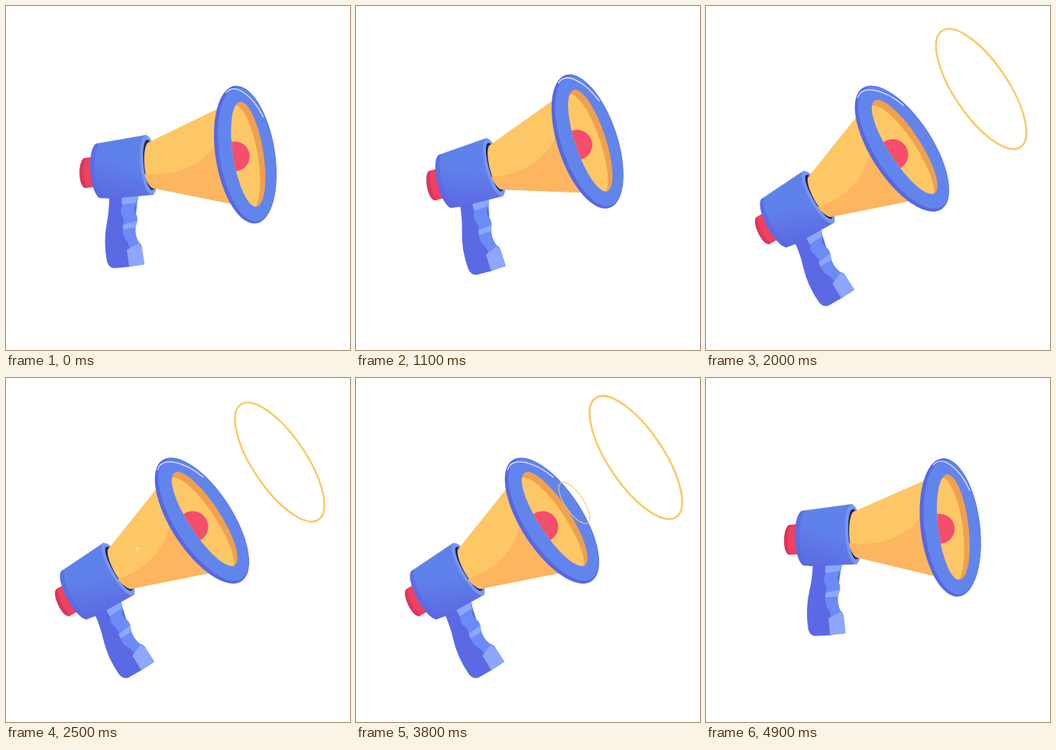
An HTML page for the animation above (5000 ms loop, 450 by 450 pixels).

```html
<!DOCTYPE html>
<html>
<head>
<meta charset="utf-8">
<style>
html, body { margin: 0; width: 100%; height: 100%; overflow: hidden; background: #fff; }
svg { display: block; width: 100vw; height: 100vh; }
</style>
</head>
<body>
<svg viewBox="0 0 450 450">
  <defs>
    <linearGradient id="body" x1=".55" y1="0" x2=".3" y2="1">
      <stop offset=".4" stop-color="#5f82ea"/><stop offset="1" stop-color="#5c69e3"/>
    </linearGradient>
    <clipPath id="mouth"><ellipse cx="4" rx="20" ry="69.500"/></clipPath>
  </defs>
  <g id="horn">
    <path fill="#f2405f" d="M103 199L116 197V237L104 238C94 237 94 200 103 199Z"/>
    <path fill="#dd3560" d="M103 199C94 200 94 237 104 238L107 237.500C100 232 99 204 106 198.500Z"/>
    <path fill="#5b6ae4" d="M134 246L173 243L163 341L141 343Q134 342 132 334Q127 308 132 283Q135 268 135 250Z"/>
    <path fill="#6c8bf6" d="M151 250L173 246Q174 254 168 263Q167 268 171 274Q173 279 170 287Q168 298 173 308Q178 312 178 318L181 338L161 341L162 320Q161 313 159 309Q152 302 153 290Q156 280 151 272Q149 267 152 261Z"/>
    <path fill="#8ca7fd" d="M151 249H173L170 257L152 260ZM153 286L172 281L169 290L153 292ZM158 319L174 310L178 318L181 338L161 341Z"/>
    <path fill="url(#body)" d="M118 180L184 168.500L193 247L137 252L122 251C108 240 106 187 118 180Z"/>
    <path fill="#5b69e2" d="M118 180C106 187 108 240 122 251L127 251.500C114 236 113 194 122 179.500Z" opacity=".7"/>
    <g transform="translate(187 208) rotate(-6)">
      <ellipse rx="11" ry="39" fill="#7896f6"/>
      <ellipse cx="1" rx="8" ry="33" fill="#23264f"/>
    </g>
    <path id="cone" fill="#fdc766"/>
    <path id="shade" fill="#fdb55f"/>
    <path id="star" fill="#fffbe8"/>
    <g id="rim">
      <ellipse rx="38.900" ry="91" fill="#5868e2"/>
      <ellipse cx="2.200" rx="36" ry="88.500" fill="#6285ed"/>
      <path d="M-12 -84C2 -96 22 -74 31 -45" fill="none" stroke="#fff" stroke-width="1.300" stroke-linecap="round" opacity=".8"/>
      <g clip-path="url(#mouth)">
        <ellipse cx="4" rx="20" ry="69.500" fill="#f0a04e"/>
        <ellipse cx="-4" cy="4" rx="20" ry="70" fill="#fdc766"/>
        <circle cx="-14" r="19.500" fill="#f34e6b"/>
      </g>
    </g>
  </g>
  <g id="waves" fill="none" stroke="#f9ca66"></g>
</svg>
<script>
const LOOP = 5000, FIRST = 1550, PERIOD = 550, COUNT = 5, LIFE = 720;
const $ = id => document.getElementById(id);

// poses: button x, button y, angle
const READY = [116, 206, 3.5], START = [104, 218, 0], LIFT = [104, 230, -7.5],
  HOLD = [99, 236, -10], WIND = [73, 305, -28.2], SHOUT = [75, 293, -24];
const TIMELINE = [
  [-200, READY], [0, START], [600, LIFT], [1200, HOLD], [1500, WIND],
  [1650, SHOUT], [4300, SHOUT], [4450, WIND], [4800, READY]
];

// speed through a key: zero at turning points, so nothing overshoots
function speed(n, axis) {
  const slope = i => (TIMELINE[i + 1][1][axis] - TIMELINE[i][1][axis]) / (TIMELINE[i + 1][0] - TIMELINE[i][0]);
  if (n === 0 || n === TIMELINE.length - 1) return 0;
  const a = slope(n - 1), b = slope(n);
  return a * b > 0 ? 2 * a * b / (a + b) : 0;
}

function poseAt(t) {
  if (t >= 4800) t -= LOOP;
  const i = TIMELINE.findLastIndex(key => key[0] <= t);
  const [t0, from] = TIMELINE[i], [t1, to] = TIMELINE[i + 1];
  const d = t1 - t0, u = (t - t0) / d;
  return from.map((v, k) => v + (to[k] - v) * u * u * (3 - 2 * u)
    + d * u * (1 - u) * ((1 - u) * speed(i, k) - u * speed(i + 1, k)));
}

const clamp = v => Math.max(0, Math.min(1, v));
const bump = (t, from, to) => Math.sin(Math.PI * clamp((t - from) / (to - from))) ** 2;

const rings = Array.from({ length: COUNT }, () =>
  $('waves').appendChild(document.createElementNS('http://www.w3.org/2000/svg', 'ellipse')));

function drawHorn(t) {
  let [x, y, angle] = poseAt(t);
  let s = 1 + .04 * clamp(-angle / 24) ** 2 + .22 * bump(t, 150, 550);
  for (let i = 0; i < COUNT; i++) {
    const age = t - FIRST - i * PERIOD, kick = bump(age, 100, 400);
    x -= 1.5 * kick;
    y += 9 * kick;
    angle -= 3 * kick;
    s += .15 * bump(age, 60, 390);
  }
  $('horn').setAttribute('transform', `translate(${x} ${y}) rotate(${angle}) translate(-104 -218)`);
  $('rim').setAttribute('transform', `translate(313 194.5) rotate(-9) scale(${s})`);

  const at = (dx, dy) => `${313 + dx * s} ${194.5 + dy * s}`;
  $('cone').setAttribute('d', `M185 179L${at(-32, -62)}L${at(-15, 65)}L191 238C181 232 177 190 185 179Z`);
  $('shade').setAttribute('d', `M181 220Q245 224 ${at(-38, -14)}L${at(-15, 65)}L191 238Q184 232 181 220Z`);

  const r = 14 * Math.sin(Math.PI * clamp((t - 2350) / 1300)), q = r * .1;
  $('star').setAttribute('d', `M0 ${-r}L${q} ${-q}L${r} 0L${q} ${q}L0 ${r}L${-q} ${q}L${-r} 0L${-q} ${-q}Z`);
  $('star').setAttribute('transform', `translate(221 193.5) rotate(${-angle})`);
}

function drawWaves(t) {
  rings.forEach((ring, i) => {
    const age = t - FIRST - i * PERIOD, u = clamp(age / LIFE);
    // share of the way left: a quick burst, then a slow drift
    const left = (1 - u) * (.26 + .74 * Math.exp(-((age / 95) ** 2)));
    const size = 95 * (1 - left ** 1.45);
    const attrs = {
      rx: size * .383, ry: size, 'stroke-width': .6 + size * .021,
      opacity: Math.min(clamp(age / 60), clamp((LIFE - age) / 100)),
      transform: `translate(${371 - 113 * left} ${100.5 + 83 * left}) rotate(-34)`
    };
    for (const k in attrs) ring.setAttribute(k, attrs[k]);
  });
}

const start = performance.now();
function frame() {
  const t = (performance.now() - start) % LOOP;
  drawHorn(t);
  drawWaves(t);
  requestAnimationFrame(frame);
}
frame();
</script>
</body>
</html>
```
